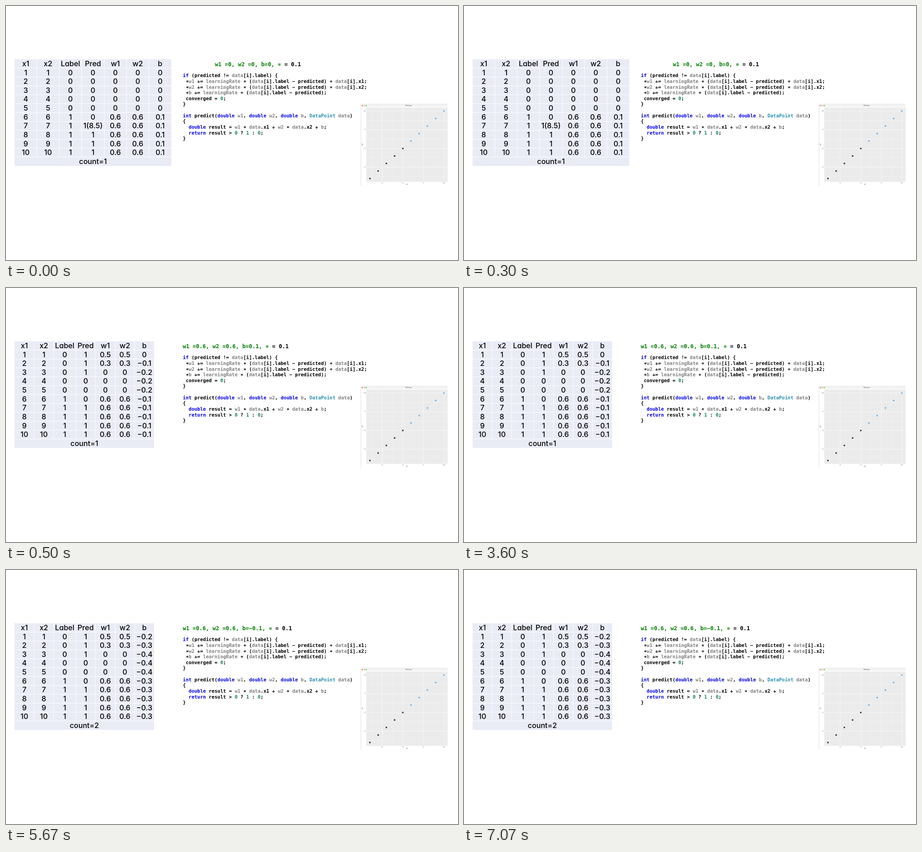
These frames come from a looping animation (998 px wide and 561 px high, 8 s). An HTML page:

```html
<!DOCTYPE html>
<html lang="en">
<head>
<meta charset="utf-8">
<title>Perceptron training steps</title>
<style>
  html, body { margin: 0; width: 100%; height: 100%; overflow: hidden; background: #fff; }
  svg { display: block; width: 100%; height: 100%; }
  text { white-space: pre; }
  .cell { font: 500 16.1px Inter, sans-serif; font-feature-settings: "cv11"; text-anchor: middle; }
  .code, .values { font: bold 10.56px "DejaVu Sans Mono", monospace; }
  .values { font-size: 12.15px; fill: #008000; }
  .key { fill: #0000e6; }
  .var { fill: #808080; }
  .num { fill: #098658; }
  .type { fill: #2b91af; }
  .black { fill: #000; }
  .tiny { font: 2.6px "Liberation Sans", sans-serif; fill: #666; text-anchor: middle; }
  .step { visibility: hidden; animation: 8s step-end infinite; }
  .step:nth-child(1) { animation-name: first; }
  .step:nth-child(2) { animation-name: second; }
  .step:nth-child(3) { animation-name: third; }
  @keyframes first { 0% { visibility: visible } 6.25%, 100% { visibility: hidden } }
  @keyframes second { 0% { visibility: hidden } 6.25% { visibility: visible } 70.875%, 100% { visibility: hidden } }
  @keyframes third { 0% { visibility: hidden } 70.875%, 100% { visibility: visible } }
</style>
</head>
<body>
<svg viewBox="0 0 998 561">
  <g id="steps"></g>
  <g id="code"></g>
  <g id="plot"></g>
</svg>
<script>
const TOP = 117.6, ROW = 19.63, LEFT = 19;
const HEADS = ["x1", "x2", "Label", "Pred", "w1", "w2", "b"];
const INPUT = "1 2 3 4 5 6 7 8 9 10";
const LABEL = "0 0 0 0 0 1 1 1 1 1";
const START = "0 0 0 0 0 0.6 0.6 0.6 0.6 0.6";
const LATER = "0.5 0.3 0 0 0 0.6 0.6 0.6 0.6 0.6";
const PRED = "1 1 1 0 0 0 1 1 1 1";
const WIDE = [19, 68, 117.5, 167, 217, 266, 315.7, 365];
const NARROW = [19, 62, 105.2, 154, 197.7, 241, 284, 327];

const steps = [
  { edges: WIDE, pred: "0 0 0 0 0 0 1(8.5) 1 1 1",
    w: START, b: "0 0 0 0 0 0.1 0.1 0.1 0.1 0.1", count: 1,
    x: 461.2, values: "w1 =0, w2 =0, b=0, ∝" },
  { edges: NARROW, pred: PRED,
    w: LATER, b: "0 -0.1 -0.2 -0.2 -0.2 -0.1 -0.1 -0.1 -0.1 -0.1", count: 1,
    x: 390.2, values: "w1 =0.6, w2 =0.6, b=0.1, ∝" },
  { edges: NARROW, pred: PRED,
    w: LATER, b: "-0.2 -0.3 -0.4 -0.4 -0.4 -0.3 -0.3 -0.3 -0.3 -0.3", count: 2,
    x: 390.2, values: "w1 =0.6, w2 =0.6, b=−0.1, ∝" }
];

const text = (x, y, kind, content, extra = "") =>
  `<text x="${x}" y="${y}" class="${kind}" ${extra}>${content}</text>`;
const rect = (x, y, w, h, fill) =>
  `<rect x="${x}" y="${y}" width="${w}" height="${h}" fill="${fill}"/>`;
const line = (x1, y1, x2, y2, width, color = "#fff") =>
  `<path d="M${x1} ${y1}L${x2} ${y2}" stroke="${color}" stroke-width="${width}"/>`;
const dot = (x, y, r, fill) => `<circle cx="${x}" cy="${y}" r="${r}" fill="${fill}"/>`;

function drawStep({ edges, pred, w, b, count, x, values }) {
  const right = edges[7];
  const baseline = row => TOP + ROW * (row + .5) + 5.5;
  let out = rect(LEFT, TOP, right - LEFT, ROW * 12, "#e9ebf5");
  for (let i = 1; i < 12; i++) out += line(LEFT, TOP + i * ROW, right, TOP + i * ROW, 1);
  for (const edge of edges.slice(1, 7)) out += line(edge, TOP, edge, TOP + ROW * 11, 1);
  [INPUT, INPUT, LABEL, pred, w, w, b].forEach((column, c) => {
    const middle = (edges[c] + edges[c + 1]) / 2;
    [HEADS[c], ...column.split(" ")].forEach((value, row) => {
      out += text(middle, baseline(row), "cell", value.replace("-", "−"));
    });
  });
  out += text((LEFT + right) / 2, baseline(11), "cell", "count=" + count);
  out += text(x, 133.2, "values", values + '<tspan class="black"> = 0.1</tspan>');
  return `<g class="step">${out}</g>`;
}

// Prefixes mark colours: @ keyword, ~ variable, # number, $ type.
const source = `@if (predicted != ~data[i].label) {
 ∗~w1 += ~learningRate ∗ (~data[i].label − predicted) ∗ ~data[i].x1;
 ∗~w2 += ~learningRate ∗ (~data[i].label − predicted) ∗ ~data[i].x2;
 ∗~b += ~learningRate ∗ (~data[i].label − predicted);
 converged = #0;
}

@int predict(@double ~w1, @double ~w2, @double ~b, $DataPoint ~data)
{
  @double result = ~w1 ∗ ~data.x1 + ~w2 ∗ ~data.x2 + ~b;
  @return result > #0 ? #1 : #0;
}`;
const kinds = { "@": "key", "~": "var", "#": "num", "$": "type" };

function drawCode() {
  return source.split("\n").map((row, i) => text(390.6, 157.3 + i * 12.62, "code",
    row.replace(/>/g, "&gt;").replace(/([@~#$])(\w+)/g,
      (_, mark, word) => `<tspan class="${kinds[mark]}">${word}</tspan>`))).join("");
}

function drawPlot() {
  const px = v => 785.4 + v * 18.14, py = v => 397.5 - v * 16.55;
  let out = rect(783.5, 216.5, 191.5, 6.5, "#f3f3f3") + rect(795.5, 224.3, 179.5, 164, "#ebebeb");
  out += line(783.7, 217, 783.7, 397, .7, "#d0d0d0") + line(783.5, 216.6, 975, 216.6, .5, "#d4d4d4");
  ["#ff5f57", "#febc2e", "#28c840"].forEach((c, i) => out += dot(787 + i * 4.2, 220, 1.3, c));
  out += text(889, 221, "tiny", "Plot Zoom", 'style="fill:#333;font-size:3px"');
  for (let v = 1.25; v <= 10; v += 1.25) {
    const major = v % 2.5 === 0, width = major ? .6 : .3;
    out += line(px(v), 224.3, px(v), 388.3, width) + line(795.5, py(v), 975, py(v), width);
    if (major) {
      out += text(px(v), 391.8, "tiny", v.toFixed(1));
      out += text(792.3, py(v) + 1, "tiny", v.toFixed(1));
    }
  }
  out += text(885, 395, "tiny", "x1", 'style="fill:#222;font-size:3.4px"');
  out += text(0, 0, "tiny", "x2", 'transform="translate(788 306) rotate(-90)" style="fill:#222;font-size:3.4px"');
  for (let v = 1; v <= 10; v++) out += dot(px(v), py(v), 1.75, v > 5 ? "#56b1f7" : "#132b43");
  return out;
}

const fill = (id, content) => document.getElementById(id).innerHTML = content;
fill("steps", steps.map(drawStep).join(""));
fill("code", drawCode());
fill("plot", drawPlot());
</script>
</body>
</html>
```
